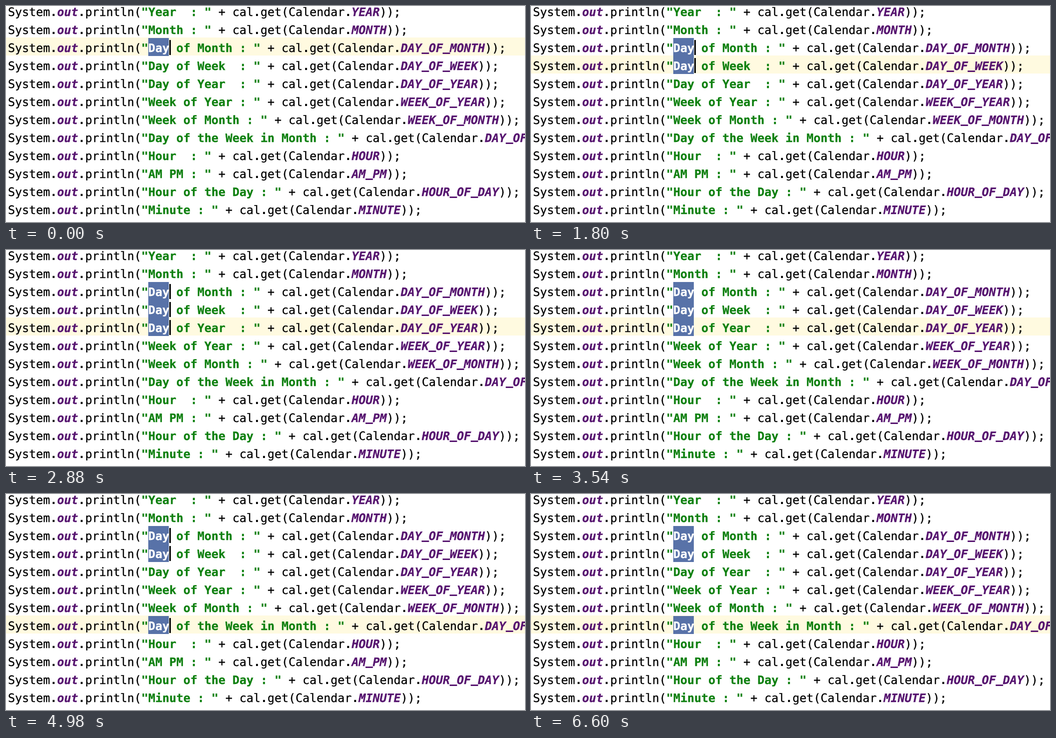
Write an HTML page that moves like this. It is 1036 px wide and 432 px high and loops after 6.66 s.

```html
<!DOCTYPE html>
<html lang="en">
<head>
<meta charset="utf-8">
<title>Multiple carets</title>
<style>
  html, body { margin: 0; width: 100%; height: 100%; overflow: hidden; background: #fff; }
  svg { display: block; }
  text {
    font: 23.254px "DejaVu Sans Mono", "Liberation Mono", monospace;
    white-space: pre;
    text-rendering: geometricPrecision;
    color: #000;
  }
  tspan { fill: currentColor; stroke: currentColor; stroke-width: 0.3px; }
  .string { color: #0f8010; font-weight: bold; }
  .field { color: #56146f; font-weight: bold; font-style: italic; }
  .selected { color: #fff; }
  .dot { font-weight: bold; stroke: none; }
  .underscore { baseline-shift: 2.5px; stroke-width: 0.8px; }
</style>
</head>
<body>
<svg id="stage" width="1036" height="432" viewBox="0 0 1036 432"></svg>
<script>
const LOOP = 6660, BLINK = 500;
const ROW = 36, TOP = -8, BASELINE = 28, LEFT = 4, CHAR = 14;
const WORD = "Day", WORD_X = LEFT + 20 * CHAR, WORD_END = WORD_X + 3 * CHAR;

const lines = [
  ["Year  : ", "YEAR"],
  ["Month : ", "MONTH"],
  ["Day of Month : ", "DAY_OF_MONTH"],
  ["Day of Week  : ", "DAY_OF_WEEK"],
  ["Day of Year  : ", "DAY_OF_YEAR"],
  ["Week of Year : ", "WEEK_OF_YEAR"],
  ["Week of Month : ", "WEEK_OF_MONTH"],
  ["Day of the Week in Month : ", "DAY_OF_WEEK_IN_MONTH"],
  ["Hour  : ", "HOUR"],
  ["AM PM : ", "AM_PM"],
  ["Hour of the Day : ", "HOUR_OF_DAY"],
  ["Minute : ", "MINUTE"]
];

// The last selected row is the current line; the caret blinks from `blinkFrom`.
const steps = [
  { at: 0, blinkFrom: -380, rows: [2] },
  { at: 1380, blinkFrom: 1380, rows: [2, 3] },
  { at: 2760, blinkFrom: 2760, rows: [2, 3, 4] },
  { at: 4980, blinkFrom: 4980, rows: [2, 3, 7] }
];

const stage = document.getElementById("stage");

function add(parent, tag, attrs, content = "") {
  const node = document.createElementNS("http://www.w3.org/2000/svg", tag);
  for (const key in attrs) node.setAttribute(key, attrs[key]);
  node.textContent = content;
  return parent.appendChild(node);
}

// Full stops are set heavier and underscores closer to the baseline.
const punctuation = { ".": "dot", "_": "underscore" };

function addSpan(parent, content, cls = "") {
  const span = add(parent, "tspan", { class: cls });
  for (const part of content.split(/([._])/).filter(Boolean)) {
    add(span, "tspan", { class: punctuation[part] || "" }, part);
  }
  return span;
}

const rowTop = i => TOP + i * ROW;
const show = (node, on) => node.setAttribute("visibility", on ? "visible" : "hidden");

const currentLine = add(stage, "rect", { width: 1036, height: ROW, fill: "#fffae0" });

const rows = lines.map(([label, field], i) => {
  const y = rowTop(i);
  const selection = add(stage, "rect", { x: WORD_X, y, width: 3 * CHAR - 1, height: ROW, fill: "#5872a8" });
  const text = add(stage, "text", { x: LEFT, y: y + BASELINE });

  addSpan(text, "System.");
  addSpan(text, "out", "field");
  addSpan(text, ".println(");
  addSpan(text, '"', "string");
  const word = addSpan(text, label.slice(0, WORD.length), "string");
  addSpan(text, label.slice(WORD.length) + '"', "string");
  addSpan(text, " + cal.get(Calendar.");
  addSpan(text, field, "field");
  addSpan(text, "));");

  const caret = add(stage, "rect", { x: WORD_END, y: y + 4, width: 3, height: 30, fill: "#000" });
  return { selection, word, caret };
});

function render(time) {
  const t = time % LOOP;
  const step = steps.filter(s => s.at <= t).pop();
  const caretOn = (t - step.blinkFrom) % (2 * BLINK) < BLINK;

  currentLine.setAttribute("y", rowTop(step.rows[step.rows.length - 1]) - 1);
  rows.forEach(({ selection, word, caret }, i) => {
    const selected = step.rows.includes(i);
    show(selection, selected);
    show(caret, selected && caretOn);
    word.classList.toggle("selected", selected);
  });
}

const start = performance.now();
function tick() {
  render(performance.now() - start);
  requestAnimationFrame(tick);
}
tick();
</script>
</body>
</html>
```
